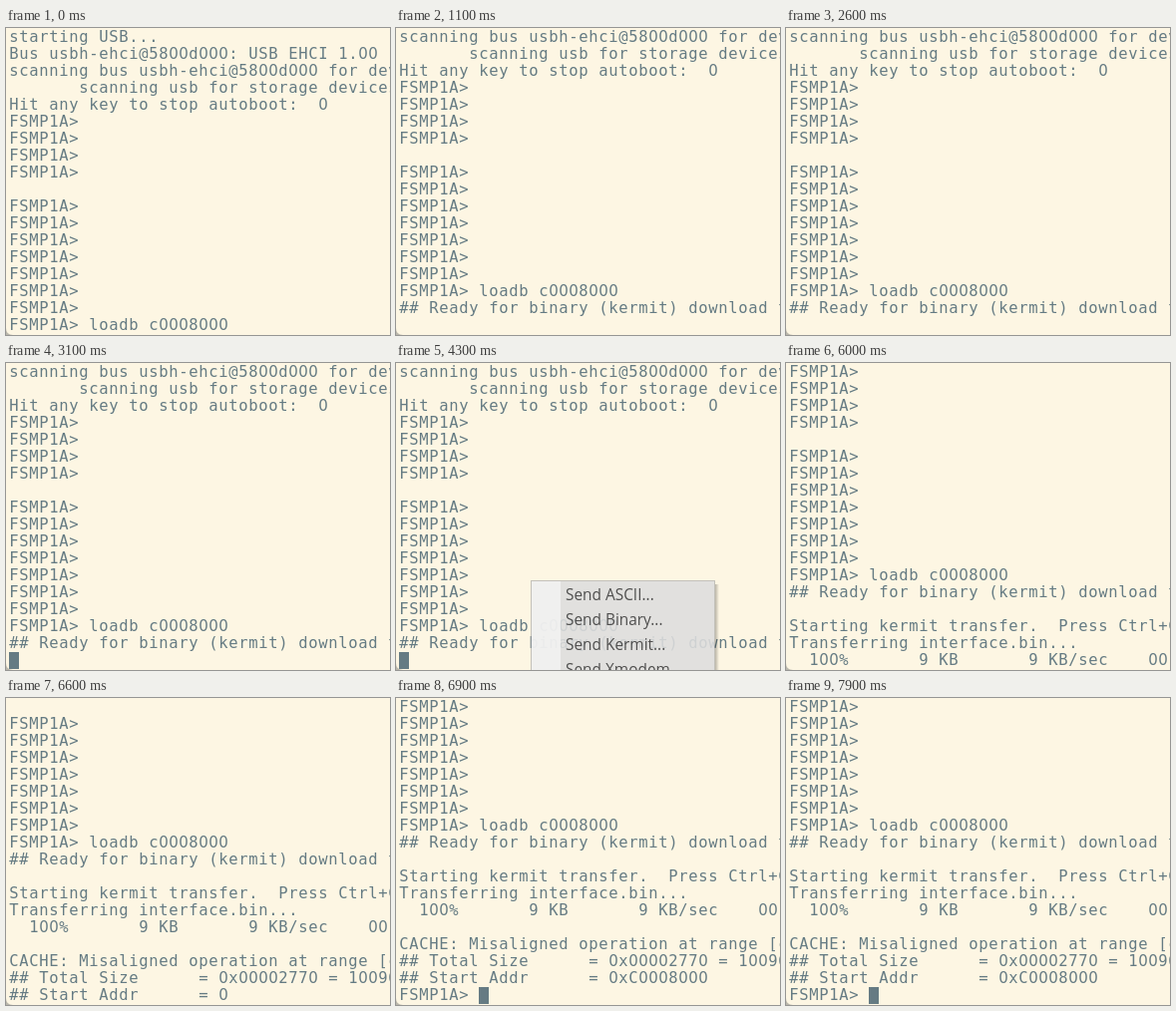
An HTML page with a canvas that plays this animation: 385x308 px, repeating every 8000 ms.

```html
<!DOCTYPE html>
<html lang="en">
<head>
<meta charset="utf-8">
<title>Serial console</title>
<style>
  html, body { margin: 0; width: 100%; height: 100%; overflow: hidden; background: #fdf6e3; }
  canvas { display: block; }
</style>
</head>
<body>
<canvas id="stage" width="385" height="308"></canvas>
<script>
const ctx = document.getElementById('stage').getContext('2d');
const LOOP = 8000, ROWS = 18, CELL = 10, LINE = 17, LEFT = 3, TOP = 1;
const PAPER = '#fdf6e3', INK = '#657b83';
const MONO = '15.5px "DejaVu Sans Mono", monospace';
const ZERO = '15px "DejaVu Sans", sans-serif'; // plain zero without a dot
const MENU_FONT = '15.4px "Open Sans", sans-serif';

const PROMPT = 'FSMP1A> ';
const prompts = n => Array(n).fill(PROMPT);
const boot = [
  'starting USB...',
  'Bus usbh-ehci@5800d000: USB EHCI 1.00',
  'scanning bus usbh-ehci@5800d000 for devices...',
  '       scanning usb for storage devices...',
  'Hit any key to stop autoboot:  0',
  ...prompts(4), '', ...prompts(7),
  PROMPT + 'loadb c0008000'
];
const ready = ['## Ready for binary (kermit) download to 0xC0008000', ''];
const transfer = ['Starting kermit transfer.  Press Ctrl+C to cancel.', 'Transferring interface.bin...'];
const summary = ['', 'CACHE: Misaligned operation at range [c0008000, c000a770]',
  '## Total Size      = 0x00002770 = 10096 Bytes'];

// Times at which the block cursor switches on or off
const blinks = [300, 800, 1200, 1700, 2200, 2600, 3000, 3500, 4000, 4500, 4900, 5200, 6900, 7400, 7900];
const menuItems = ['Send ASCII...', 'Send Binary...', 'Send Kermit...', 'Send Xmodem...'];

function progress(percent, kb) {
  return `${String(percent).padStart(5)}%       ${kb} KB       ${kb} KB/sec    00:00:00`;
}

function logAt(t) {
  const lines = [...boot];
  if (t >= 1100) lines.push(...ready);
  if (t >= 5200) lines.push(...transfer, t < 6000 ? progress(0, 0) : progress(100, 9));
  if (t >= 6600) lines.push(...summary, '## Start Addr      = 0' + (t < 6700 ? '' : 'xC0008000'));
  if (t >= 6700) lines.push(PROMPT);
  return lines.slice(-ROWS);
}

function rect(color, x, y, w, h) {
  ctx.fillStyle = color;
  ctx.fillRect(x, y, w, h);
}

function drawLine(text, row) {
  ctx.fillStyle = INK;
  ctx.textAlign = 'center';
  [...text].forEach((ch, col) => {
    ctx.font = ch === '0' ? ZERO : MONO;
    ctx.fillText(ch, LEFT + (col + 0.5) * CELL, TOP + row * LINE + 13);
  });
}

function drawCorner() {
  ctx.fillStyle = '#b9b6ab';
  ctx.beginPath();
  ctx.moveTo(0, 301);
  ctx.quadraticCurveTo(0, 308, 7, 308);
  ctx.lineTo(0, 308);
  ctx.fill();
}

function drawMenu(t) {
  ctx.globalAlpha = t < 4400 ? 0.65 : 1;
  const shadow = ctx.createLinearGradient(320, 0, 324, 0);
  shadow.addColorStop(0, 'rgba(0,0,0,.4)');
  shadow.addColorStop(1, 'rgba(0,0,0,0)');
  rect(shadow, 320, 222, 4, 86);
  rect('#a5a5a5', 135, 218, 185, 90);
  rect('#f2f2f2', 136, 219, 183, 89);
  rect('#f9f9f9', 136, 219, 29, 89);
  if (t >= 4500) rect('#91c9f7', 136, t < 4700 ? 220 : 270, 183, 25);
  ctx.fillStyle = '#000';
  ctx.font = MENU_FONT;
  ctx.textAlign = 'left';
  menuItems.forEach((item, i) => ctx.fillText(item, 170, 238 + i * 25));
  ctx.globalAlpha = 1;
}

function draw(t) {
  const lines = logAt(t);
  rect(PAPER, 0, 0, 385, 308);
  drawCorner();
  lines.forEach(drawLine);
  if (blinks.filter(b => b <= t).length % 2) {
    const col = lines[ROWS - 1].length;
    rect(INK, LEFT + col * CELL, TOP + (ROWS - 1) * LINE, CELL, LINE);
  }
  if (t >= 4300 && t < 5200) drawMenu(t);
}

const start = performance.now();
function tick() {
  draw((performance.now() - start) % LOOP);
  requestAnimationFrame(tick);
}
tick();
</script>
</body>
</html>
```
